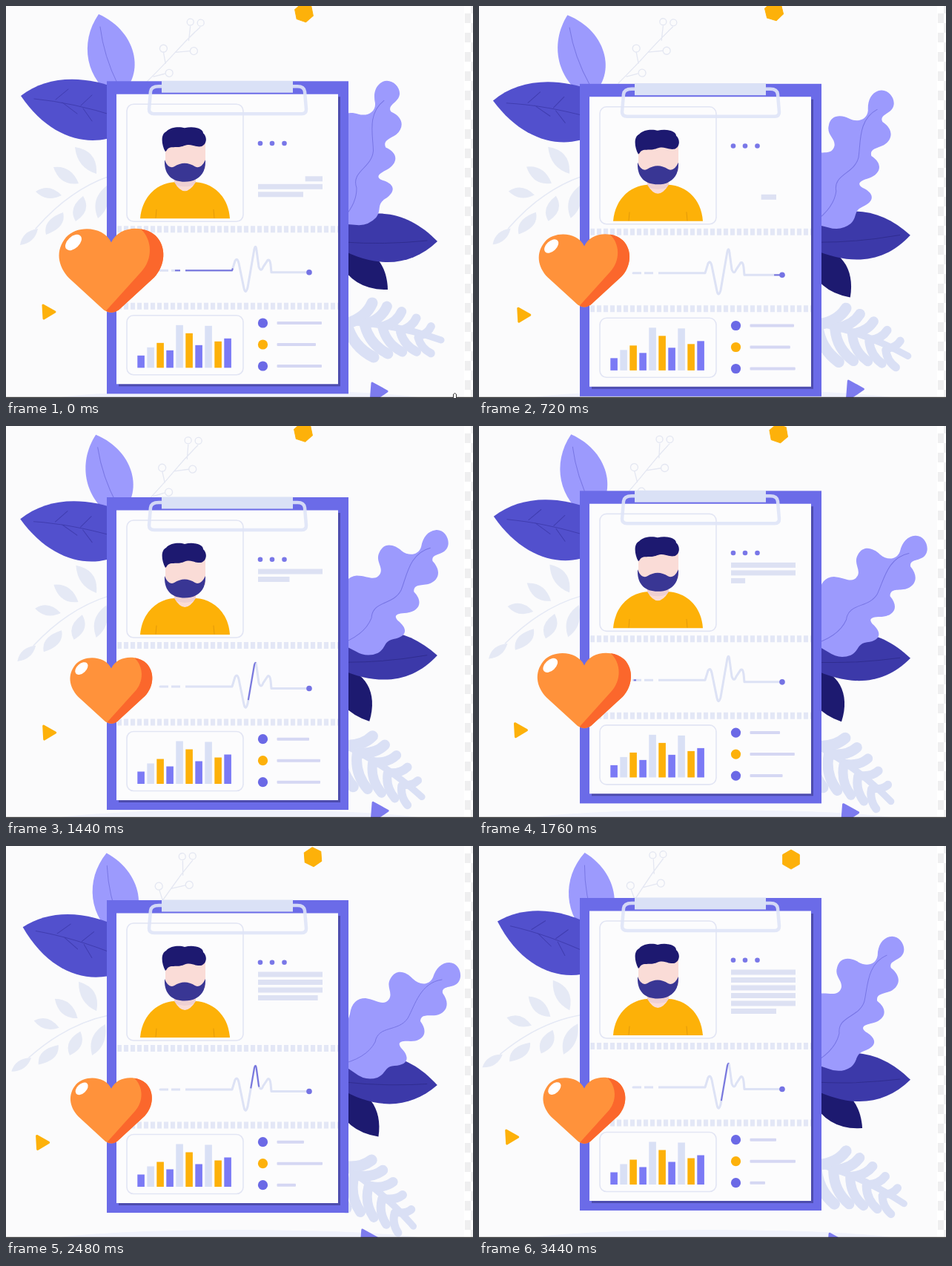
Animation of 630 by 528 pixels, one loop 3520 ms. Source, as an HTML page:

```html
<!DOCTYPE html>
<html lang="en">
<head>
<meta charset="utf-8">
<title>Health record</title>
<style>
html, body { margin: 0; width: 100%; height: 100%; overflow: hidden; background: #fbfbfc; }
svg { display: block; width: 630px; height: 528px; }
.line { fill: none; stroke-linecap: round; stroke-linejoin: round; }
</style>
</head>
<body>
<svg viewBox="0 0 630 528">
  <ellipse cx="315" cy="537" rx="280" ry="20" fill="#f0f2fc"/>

  <g id="twig" class="line" stroke="#e4e7f2" stroke-width="1.3">
    <path d="M188 104Q212 80 228 62T261 28M248 27L246 46M212 62L215 77M248 60L228 62M214 91L199 95"/>
    <circle cx="248" cy="21" r="4.5"/><circle cx="262" cy="22" r="4.5"/>
    <circle cx="212" cy="57" r="5"/><circle cx="253" cy="60" r="5"/><circle cx="220" cy="90" r="5"/>
  </g>

  <g id="branch" fill="#e5e9f5">
    <path class="line" d="M140 229Q85 248 40 300" stroke="#e5e9f5" stroke-width="1.5"/>
    <path d="M93 190Q124 195 122 226Q96 218 93 190ZM64 217Q88 214 98 239Q73 243 64 217ZM40 250Q58 238 75 255Q55 265 40 250Z"/>
    <path d="M19 322Q22 303 43 300Q39 319 19 322ZM54 308Q49 288 77 278Q82 298 54 308ZM94 290Q83 272 104 256Q116 276 94 290ZM124 286Q113 260 136 242Q144 270 124 286Z"/>
  </g>

  <g id="topLeaf">
    <path d="M125 11C98 50 108 100 148 124C190 98 179 35 125 11Z" fill="#9c9afd"/>
    <path class="line" d="M127 28Q132 68 151 106" stroke="#7977e4"/>
  </g>
  <g id="sideLeaf">
    <path d="M20 121C55 94 105 92 155 113V172C115 192 60 180 20 121Z" fill="#5250cd"/>
    <path class="line" d="M38 125Q90 130 150 149M67 126L84 112M101 134L116 120M76 130L96 145M104 138L116 155" stroke="#403db0"/>
  </g>

  <g id="fern" class="line" stroke="#dae0f5"></g>
  <path id="lowLeaf" d="M450 326C488 318 514 342 515 382Q469 383 450 345Z" fill="#1d1a70"/>
  <g id="darkLeaf">
    <path d="M450 293C500 268 545 279 582 317C545 352 500 353 450 327Z" fill="#3c39a9"/>
    <path class="line" d="M455 318Q510 322 568 316" stroke="#302d90"/>
  </g>
  <g id="wavyLeaf">
    <path d="M440 262Q460 244 464 226Q467 205 485 205C500 207 509 217 517 206C522 197 512 189 519 178C527 164 541 170 549 179C558 188 571 188 576 177C580 164 588 157 598 157C613 157 619 180 606 187C598 191 588 189 589 198C600 213 594 225 580 228C568 229 560 226 559 236C571 252 562 263 546 263C533 262 527 264 533 272C546 285 542 295 524 296C510 297 513 307 501 312Q485 317 471 306L440 285Z" fill="#9c9afd"/>
    <path class="line" d="M447 295Q486 287 498 264C502 241 529 251 542 232C552 214 559 184 588 180" stroke="#7775e4"/>
  </g>

  <path id="hex" d="M0-13L11.3-6.5V6.5L0 13L-11.3 6.5V-6.5Z" fill="#fdb10a" stroke="#fdb10a" stroke-linejoin="round"/>
  <path id="triLeft" d="M50 403L66 412L51 421Z" fill="#fdb10a" stroke="#fdb10a" stroke-width="3" stroke-linejoin="round"/>
  <path id="triLow" d="M494 508L514 519L492 534Z" fill="#7d7bef" stroke="#7d7bef" stroke-width="3" stroke-linejoin="round"/>

  <g id="board">
    <rect x="136" width="326" height="421" fill="#6b6be8"/>
    <path d="M152 21H451V411H152Z" fill="#4d4cae"/>
    <path d="M149 17.5H448V408H149Z" fill="#fcfcfd"/>
    <rect x="163" y="31" width="157" height="158" rx="9" fill="none" stroke="#e2e5f4" stroke-width="1.6"/>
    <rect x="163" y="315.5" width="157" height="80" rx="9" fill="none" stroke="#e2e5f4" stroke-width="1.6"/>
    <path d="M150 199.5H448M150 303H448" stroke="#e3e7f6" stroke-width="9" stroke-dasharray="6 3"/>
    <path class="line" d="M206 7H393Q402 7 403 14L405 38Q405 44 399 44H200Q193 44 193 38L195 14Q196 7 206 7" stroke="#dfe5f8" stroke-width="4.5" opacity=".9"/>
    <path d="M210-.5H387V15.5H210Z" fill="#dae1f6"/>

    <path d="M215 78H269V118H256V152H227V118H215Z" fill="#fadcd7"/>
    <path d="M227 132H256V139Q241 145 227 139Z" fill="#efd0d2"/>
    <path d="M181 185C184 152 207 137 227 136Q241 160 256 136C277 137 300 153 302 185Z" fill="#fdb108"/>
    <path class="line" d="M202 184L203 173M281 184L280 173" stroke="#e39a08"/>
    <path d="M214 106Q219 119 227 115Q241 106 255 115Q263 119 269 106C270 126 258 135.500 241 135.500C224 135.500 213 126 214 106Z" fill="#393694"/>
    <path d="M215 95C209 84 209 71 216 68C222 61 235 61 241 63C252 60 266 63 266 70C272 75 271 86 263 88C254 89 250 83 240 87C231 91 220 86 217 93Z" fill="#1d1970"/>

    <g fill="#7977e8"><circle cx="343" cy="83.700" r="3.300"/><circle cx="359" cy="83.700" r="3.300"/><circle cx="375.500" cy="83.700" r="3.300"/></g>
    <g id="text" fill="#dde1f3"></g>

    <g class="line">
      <path id="ecg" d="M208 255H305L309 242Q312 237 314 245L321 279Q323 288 326 278L335 226Q337 219 338 228L341 250Q344 258 347 250L353 241Q356 239 357 247L358 257.5H409" stroke="#dde2f5" stroke-width="3"/>
      <path id="pulse" pathLength="340" stroke="#7674dd" stroke-width="2" style="stroke-linecap:butt"/>
    </g>
    <path d="M219 252h4v6h-4zM235 252h7v6h-7z" fill="#fcfcfd"/>
    <circle cx="409" cy="257.5" r="3.8" fill="#7573e4"/>
    <g id="chart"></g>
    <g id="legend"></g>
  </g>

  <g id="heart">
    <path d="M0-38C-10-60-46-62-61-45C-76-27-72-6-57 10L-10 53Q0 60 10 53L58 9C73-7 75-32 60-47C43-62 10-60 0-38Z" fill="#ff923b"/>
    <path d="M40-56C55-42 57-16 40 2L-7 54Q1 59 10 53L58 9C73-7 75-32 60-47Q51-55 40-56Z" fill="#fb672c"/>
    <ellipse cx="-51" cy="-38" rx="13" ry="8" transform="rotate(-43 -51 -38)" fill="#fff"/>
  </g>

  <path d="M618 0H630V528H618Z" fill="#fff"/>
  <path d="M623 10V528" stroke="#efeff0" stroke-width="8" stroke-dasharray="13"/>
  <path d="M628.5 0V528" stroke="#f1f1f2" stroke-width="3" stroke-dasharray="10 13 3 0"/>
  <path d="M0 527.4H630" stroke="#333" stroke-width="1.2"/>
  <path id="mark" d="M603.5 528V523Q605.5 520 607.5 523V528" fill="#fff" stroke="#333"/>
</svg>
<script>
const $ = id => document.getElementById(id);
const LOOP = 3520, STEP = 80;
const KEYS = [0, 400, 1040, 1440, 2000, 2480, 3440];
const BEAT = [0, 250, 290, 650, 690, 730, 950, 1000];
const clamp = x => Math.max(0, Math.min(1, x));

// Smooth curve through values v at times k
function track(v, t, k = KEYS) {
  const last = k.length - 1;
  let i = 0;
  while (i < last - 1 && t > k[i + 1]) i++;
  const slope = j => {
    const a = Math.max(0, j - 1), b = Math.min(last, j + 1);
    return (v[b] - v[a]) / (k[b] - k[a]);
  };
  const h = k[i + 1] - k[i], u = clamp((t - k[i]) / h), w = 1 - u;
  return v[i] * w * w * (1 + 2 * u) + v[i + 1] * u * u * (3 - 2 * u)
    + h * u * w * (slope(i) * w - slope(i + 1) * u);
}

const COLORS = ['#7b7af5', '#d9e0f5', '#fdb10a'];
$('chart').innerHTML = [369, 358, 352, 362, 328, 339, 355, 329, 350, 346].map((y, i) =>
  `<rect x="${177.3 + i * 13}" y="${y + 0.5}" width="9.6" height="${385.5 - y}" fill="${COLORS[i % 3]}"/>`).join('');

$('legend').innerHTML = [325.7, 354.7, 383.7].map((y, i) =>
  `<circle cx="346.5" cy="${y}" r="6.6" fill="${i === 1 ? COLORS[2] : '#6b69e6'}"/>
   <rect x="365.5" y="${y - 2}" height="4" rx="1" fill="#d5d7f3"/>`).join('');
const bars = $('legend').querySelectorAll('rect');
const BAR_ENDS = [
  [426, 426, 422, 409, 405, 402, 401],
  [418, 418, 422, 424, 427, 427, 427],
  [426, 426, 427, 424, 399, 391, 386]
];

$('text').innerHTML = [...Array(6)].map((_, i) => `<rect y="${96.5 + i * 10.5}" height="7"/>`).join('');
const rows = [...$('text').children];
$('pulse').setAttribute('d', $('ecg').getAttribute('d'));

let fern = '<path d="M445 425Q520 426 587 450" stroke-width="9"/>';
for (let i = 0; i < 5; i++) {
  const x = 462 + i * 24, y = 427 + i * i * 1.1, s = 1 - i * 0.13;
  fern += `<path d="M${x} ${y}q${24 * s} ${-8 * s} ${32 * s} ${-27 * s}M${x - 2} ${y + 2}q${8 * s} ${30 * s} ${36 * s} ${44 * s}" stroke-width="${15 - i}"/>`;
}
$('fern').innerHTML = fern;

const move = (id, x, y, extra = '') => $(id).setAttribute('transform', `translate(${x} ${y}) ${extra}`);
const turn = (id, a, x, y) => $(id).setAttribute('transform', `rotate(${a} ${x} ${y})`);

function draw(t) {
  const sway = track([0, -1.6, -2.7, -1.6, 0.9, 4.4, 7.3], t);
  const lift = track([0, 0, 0.8, 2.2, 4.9, 7.6, 9.8], t);
  const wave = track([-29.5, -26.1, -13.9, -6.9, -1.9, 0, -15.6], t);
  const drift = track([0, -3, -4, -1, 5, 12, 19], t);

  move('board', 0, track([101.3, 104, 104, 96, 81.2, 73, 70], t));
  turn('topLeaf', sway, 150, 148);
  turn('sideLeaf', sway, 175, 150);
  turn('branch', lift, 150, 225);
  turn('twig', 0.5 - lift * 0.95, 185, 105);
  turn('wavyLeaf', wave, 449, 302);
  turn('fern', wave + 29.5, 450, 410);
  turn('darkLeaf', track([0, -2.3, -5, -3.8, -0.5, 2.4, -1], t), 460, 315);
  turn('lowLeaf', track([0, 6.2, 15.8, 18.8, 18.8, 10, -1.8], t), 455, 315);
  move('hex', 402 + drift, 9 + drift * 0.48, `rotate(${(drift - 19) * 0.6})`);
  move('triLeft', -0.7 * drift, -1.05 * drift);
  move('triLow', -1.1 * drift, 0.75 * drift);

  const size = (124.6 + 15.4 * Math.cos(t * Math.PI / 500)) / 140;
  move('heart', 142, 356.5, `scale(${size})`);

  const p = (t + 250) % 1000;
  const head = track([0, 100, 120, 212, 222, 250, 340, 340], p, BEAT);
  const tail = track([0, 20, 50, 150, 170, 190, 320, 340], p, BEAT);
  $('pulse').setAttribute('stroke-dasharray', `0 ${Math.max(0, tail)} ${Math.max(0, head - tail)} 999`);

  // Rows are wiped from the left, then written again one by one
  rows.forEach((row, i) => {
    const full = i === 5 ? 61 : 87;
    const start = 810 + 430 * i;
    const writing = t >= start;
    const gone = i < 3 ? 1 : clamp((t + 300 - 420 * (i - 3)) / (i === 5 ? 270 : 410));
    row.setAttribute('x', 340 + (writing ? 0 : full * gone));
    row.setAttribute('width', full * (writing ? clamp((t - start) / 410) : 1 - gone));
  });
  bars.forEach((bar, i) => bar.setAttribute('width', track(BAR_ENDS[i], t) - 365.5));
  $('mark').style.display = t < 720 ? '' : 'none';
}

function tick() {
  draw(Math.floor(performance.now() % LOOP / STEP) * STEP);
  requestAnimationFrame(tick);
}
tick();
</script>
</body>
</html>
```
